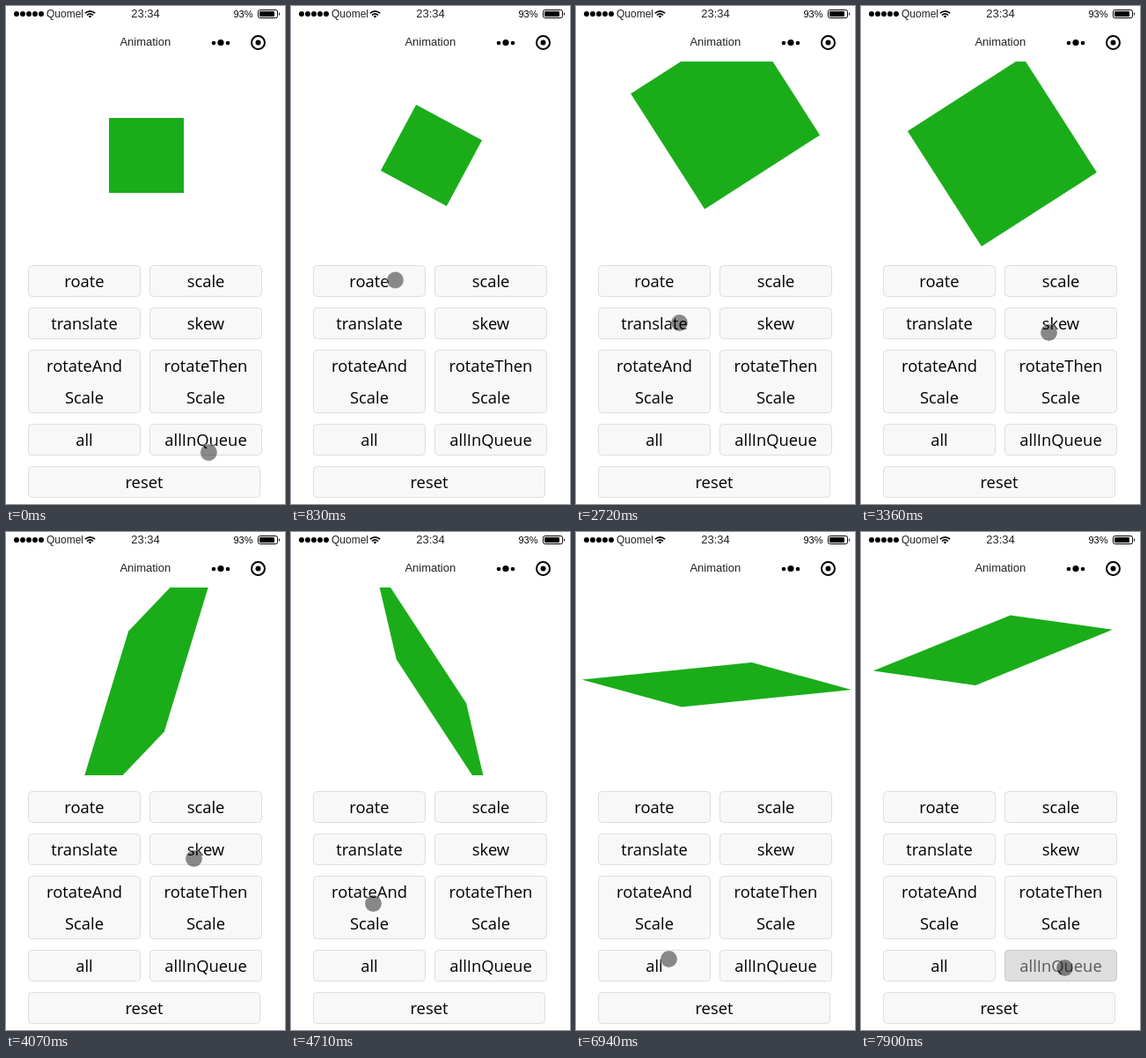
An HTML page for the animation above (8000 ms loop, 317x565 px).

```html
<!DOCTYPE html>
<html lang="en">
<head>
<meta charset="utf-8">
<title>Animation</title>
<style>
  html, body { margin: 0; width: 100%; height: 100%; overflow: hidden; background: #fff; }
  svg { display: block; width: 317px; height: 565px; }
  text { font: 13px "Liberation Sans", Arial, sans-serif; fill: #222; }
  .button rect { fill: #f8f8f8; stroke: #dedede; }
  .button text { font: 18.4px "Open Sans", "Noto Sans", sans-serif; fill: #000; text-anchor: middle; }
  .button.hover rect { fill: #dedede; stroke: #c8c8c8; }
  .button.hover text { fill-opacity: .6; }
  #pointer { fill: rgba(0, 0, 0, .45); stroke: rgba(255, 255, 255, .5); }
</style>
</head>
<body>
<svg viewBox="0 0 317 565">
  <defs><clipPath id="stage"><rect y="63" width="317" height="213"/></clipPath></defs>

  <g id="signal"></g>
  <text x="46" y="13" style="font-size:12px">Quomel</text>
  <g fill="none" stroke="#000" stroke-width="1.6">
    <path d="M89.8 8.2Q95.5 3.4 101.2 8.2M91.9 10.5Q95.5 7.4 99.1 10.5"/>
    <path d="M93.6 11.6Q95.5 10 97.4 11.6L95.5 13.6Z" fill="#000" stroke="none"/>
  </g>
  <text x="158.5" y="13" text-anchor="middle">23:34</text>
  <text x="258.5" y="13" style="font-size:11px;fill:#000">93%</text>
  <rect x="286.5" y="4.5" width="22" height="9" rx="2" fill="none" stroke="#000"/>
  <rect x="288" y="6" width="17" height="6" rx="1"/>
  <path d="M310 7Q312 9 310 11Z"/>

  <text x="158.3" y="45" text-anchor="middle">Animation</text>
  <circle cx="236" cy="42" r="2.3"/><circle cx="244" cy="41.5" r="3.6"/><circle cx="252" cy="42" r="2.3"/>
  <circle cx="286.5" cy="41.5" r="7.5" fill="none" stroke="#000" stroke-width="2"/>
  <circle cx="286.5" cy="41.5" r="3"/>

  <g clip-path="url(#stage)">
    <rect id="box" x="-42.5" y="-42.5" width="85" height="85" fill="#1aad19"/>
  </g>
  <g id="buttons"></g>
  <circle id="pointer" r="9.7"/>
</svg>
<script>
const LOOP = 8000;
const STEP = 400;   // every change of the box
const HOLD = 110;   // a button stays dark this long before its tap
const TRAVEL = 300; // the pointer's way to the next button

const $ = id => document.getElementById(id);
const clamp = k => Math.min(1, Math.max(0, k));
const easeOut = k => 1 - (1 - k) ** 3;
const tan = degrees => Math.tan(degrees * Math.PI / 180);

function add(parent, name, attrs, text = "") {
  const node = document.createElementNS("http://www.w3.org/2000/svg", name);
  for (const key in attrs) node.setAttribute(key, attrs[key]);
  node.textContent = text;
  return parent.appendChild(node);
}

for (let i = 0; i < 5; i++) add($("signal"), "circle", { cx: 12 + 7 * i, cy: 9, r: 3 });

const buttons = {};
let top_ = 294;
for (const row of [["roate", "scale"], ["translate", "skew"], ["rotateAnd Scale", "rotateThen Scale"],
                   ["all", "allInQueue"], ["reset"]]) {
  const height = 36 * row[0].split(" ").length;
  const width = row.length > 1 ? 128 : 264;
  row.forEach((label, column) => {
    const left = 25 + 138 * column, x = left + width / 2;
    const node = add($("buttons"), "g", { class: "button" });
    add(node, "rect", { x: left + .5, y: top_ + .5, width: width - 1, height: height - 1, rx: 4 });
    label.split(" ").forEach((line, i) => add(node, "text", { x, y: top_ + 25 + 36 * i }, line));
    buttons[label] = { node, x, y: top_ + height / 2 };
  });
  top_ += height + 12;
}

// Each tap: button, time, pointer offset from the button's centre, and the box changes it queues.
// The pointer stays on the button for a while after the tap.
const taps = [
  { button: "allInQueue", at: -STEP, dx: 4.5, dy: 16.5 },
  { button: "roate", at: 480, dx: 29.5, dy: -1, steps: [{ angle: 237.3 }] },
  { button: "scale", at: 1600, dx: -11.5, dy: -2, steps: [{ scale: 1.83 }] },
  { button: "translate", at: 2574, dx: 28.5, dy: -.5, steps: [{ x: 50, y: 50 }, { x: 0, y: 0 }] },
  { button: "skew", at: 3710, dx: -13.5, dy: 10.5, steps: [{ skewX: 15, skewY: 55 }] },
  { button: "rotateAnd Scale", at: 4552, dx: 4.5, dy: -4.5, steps: [{ angle: 97.6, scale: .492 }] },
  { button: "rotateThen Scale", at: 5598, dx: 0, dy: 0, stay: 50, steps: [{ angle: 321.7 }, { scale: 1.334 }] },
  { button: "all", at: 6900, dx: 16.5, dy: -7.5,
    steps: [{ angle: 110.8, scale: 1.346, x: -22, y: 16, skewX: 12.8, skewY: 47.1 }] },
  { button: "allInQueue", at: LOOP, dx: 4.5, dy: 2.5 },
];

function boxAt(t) {
  const box = { angle: 0, scale: 1, x: 0, y: 0, skewX: 0, skewY: 0 };
  for (const { at, steps = [] } of taps) {
    steps.forEach((step, i) => {
      const k = clamp((t - at) / STEP - i);
      for (const key in step) box[key] += (step[key] - box[key]) * k;
    });
  }
  return box;
}

function pointerAt(t) {
  let x = 0, y = 0, leave = -LOOP;
  for (const { button, at, dx, dy, stay = STEP } of taps) {
    const k = easeOut(clamp((t - leave) / TRAVEL));
    x += (buttons[button].x + dx - x) * k;
    y += (buttons[button].y + dy - y) * k;
    leave = at + stay;
  }
  return { x, y };
}

function draw(t) {
  const { angle, scale, x, y, skewX, skewY } = boxAt(t);
  $("box").setAttribute("transform",
    `translate(159.5 169.5) rotate(${angle}) scale(${scale}) translate(${x} ${y}) ` +
    `matrix(1 ${tan(skewY)} ${tan(skewX)} 1 0 0)`);

  for (const { button, at } of taps) {
    buttons[button].node.classList.toggle("hover", t >= at - HOLD && t < at);
  }
  const pointer = pointerAt(t);
  $("pointer").setAttribute("cx", pointer.x);
  $("pointer").setAttribute("cy", pointer.y);
}

const start = performance.now();
function tick() {
  draw((performance.now() - start) % LOOP);
  requestAnimationFrame(tick);
}
tick();
</script>
</body>
</html>
```
